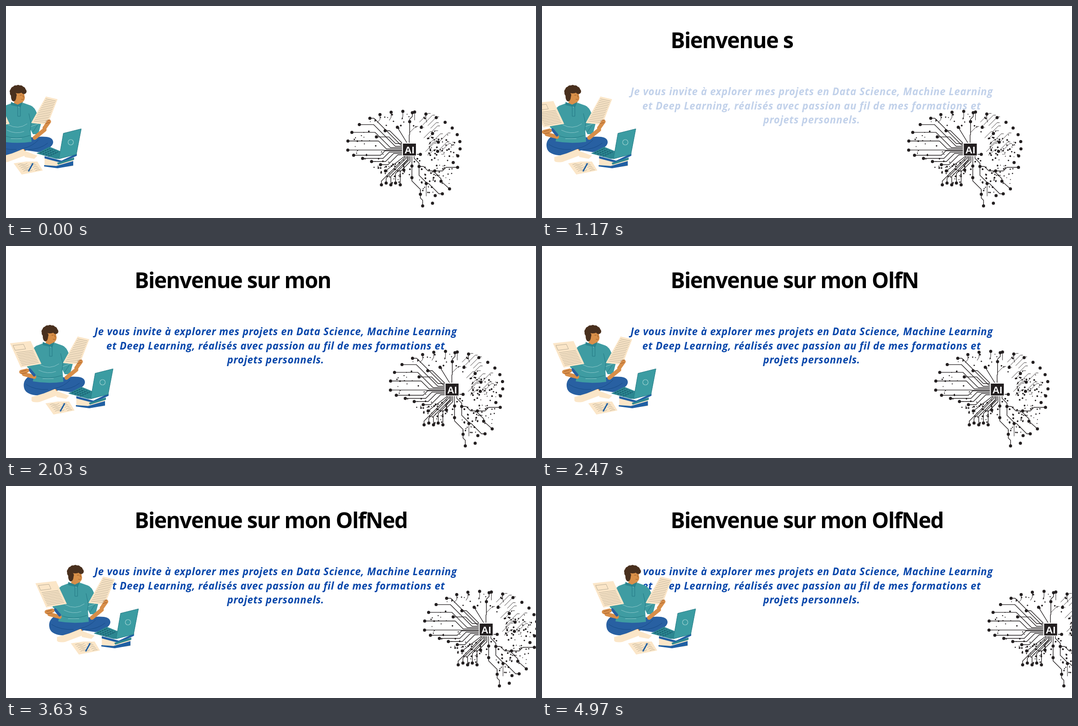
These frames come from a looping animation (1183 px wide and 473 px high, 5.01 s). An HTML page:

```html
<!DOCTYPE html>
<html lang="fr">
<head>
<meta charset="utf-8">
<title>Bienvenue</title>
<style>
  html, body { margin: 0; width: 100%; height: 100%; overflow: hidden; background: #fff; }
  svg { display: block; width: 100vw; height: 100vh; }
  text { white-space: pre; }
  #title { font: 700 48px "Open Sans", "Noto Sans", sans-serif; letter-spacing: -1.55px; }
  #intro { font: italic 700 22.5px "Open Sans", "Noto Sans", sans-serif; letter-spacing: .7px; fill: #0746aa; text-anchor: middle; }
  #chip { font: 700 22px "Liberation Sans", Arial, sans-serif; fill: #fff; text-anchor: middle; }
  .line { fill: none; stroke-linecap: round; stroke-linejoin: round; }
  .paper { fill: #fbe6c8; }
  .skin { stroke: #d88e49; }
  .rule { stroke: #a89d88; stroke-width: .8; }
</style>
</head>
<body>
<svg viewBox="0 0 1183 473">
  <g id="brain">
    <g id="traces" class="line" stroke="#231f20"></g>
    <g id="dots" fill="#231f20"></g>
    <rect x="884" y="305" width="33" height="30" fill="#fff"/>
    <rect x="886" y="307" width="29" height="26.5" fill="#231f20"/>
    <text id="chip" x="900.5" y="328.5">AI</text>
  </g>

  <g id="intro">
    <text x="602" y="199">Je vous invite à explorer mes projets en Data Science, Machine Learning</text>
    <text x="602" y="231">et Deep Learning, réalisés avec passion au fil de mes formations et</text>
    <text x="602" y="262">projets personnels.</text>
  </g>

  <text id="title" x="287" y="94"></text>

  <g id="reader">
    <!-- books -->
    <path class="paper" d="M262 336 300 346 326 336V357L290 361 262 355Z"/>
    <path fill="#1f5fa3" d="M262 335 300 345 334 329V334L300 350 262 340ZM261 355 288 357 326 346V356L291 362 261 358Z"/>
    <path fill="#2d8791" d="M290 350 328 338V343L292 354Z"/>

    <!-- legs and feet -->
    <path fill="#2860a2" d="M158 290C146 296 142 307 146 319 150 330 168 336 190 332L222 322 248 326C268 322 283 312 281 302 279 291 262 290 238 293Z"/>
    <path class="line" stroke="#174c88" d="M150 309Q170 322 199 320M213 318Q234 314 248 299M226 321Q253 319 269 306"/>
    <path class="line skin" stroke-width="10" d="M196 332 214 324"/>
    <path class="paper" d="M162 337 189 329 215 319 220 333 180 348Q164 350 162 345ZM212 321 246 334 239 341 218 337Z"/>

    <!-- body -->
    <path fill="#d88e49" d="M196 207H213V222H192Z"/>
    <path fill="#3f9ca2" d="M188 217 172 223Q163 229 158 246L152 270 168 284 165 302Q199 308 233 303L231 276 236 286H248L254 263 246 242Q240 225 231 222L214 216 205 226Z"/>
    <path fill="#2b858f" d="M187 214 202 220 214 214 208 226 187 221Z"/>
    <path class="line" stroke="#247985" d="M202 222V246H208V222M227 240 232 263 230 278M174 290Q198 299 229 289M236 281 246 266"/>
    <path class="line" stroke="#8bc6c9" d="M181 265Q203 277 223 263M178 277Q198 287 216 280M187 296H211M232 269 247 263"/>
    <path fill="#d99049" d="M193 194Q205 187 216 192L218 205Q217 214 210 215 202 215 197 207Z"/>
    <path class="line" stroke="#925321" stroke-width=".9" d="M207 199H211M214 198V203H217M210 208Q213 210 216 207"/>
    <g id="hair" fill="#49301e"></g>

    <!-- sheets and arms -->
    <path class="line skin" stroke-width="9" d="M168 292 145 286M240 294 262 276"/>
    <path class="line" stroke="#2860a2" stroke-width="6" d="M158 276 168 288"/>
    <g id="sheets"></g>
    <path class="line skin" stroke-width="9" d="M139 281 152 278M262 272 272 258"/>
    <path class="line" stroke="#9b5928" d="M139 280 150 277M139 285 151 283M265 257 274 254M264 262 273 260"/>

    <!-- loose page -->
    <path class="paper" d="M193 351 221 347H246L258 367 211 376Z"/>
    <g id="notes" class="line rule"></g>
    <path stroke="#1f5fa3" stroke-width="3" d="M226 369 236 351"/>

    <!-- laptop -->
    <path fill="#2c8791" d="M244 329 273 314 300 325 297 341H288Z"/>
    <g id="keys" stroke="#185c70" stroke-width="2" stroke-dasharray="4 1.5"></g>
    <path fill="#3b9ca2" stroke="#277b86" d="M304 284 344 274 333 331 294 341Z"/>
    <circle cx="320.5" cy="304" r="6" fill="none" stroke="#9bd0cf" stroke-width="1.2"/>
  </g>
</svg>

<script>
const LOOP = 5010, FRAME = LOOP / 150;
const TITLE = "Bienvenue sur mon OlfNed";
const $ = id => document.getElementById(id);

function add(parent, tag, attrs) {
  const el = document.createElementNS("http://www.w3.org/2000/svg", tag);
  for (const key in attrs) el.setAttribute(key, attrs[key]);
  parent.append(el);
  return el;
}

function times(count, fn) {
  for (let i = 0; i < count; i++) fn(i);
}

let seed = 41;
function random() {
  seed = (seed * 16807) % 2147483647;
  return seed / 2147483647;
}

const dot = (x, y, r = 3.5) => add($("dots"), "circle", { cx: x, cy: y, r });

const wire = (points, width = 1.4) =>
  add($("traces"), "polyline", { points: points.join(" "), "stroke-width": width });

// The brain's dome is an ellipse; angles in degrees, clockwise from the right.
function dome(angle, scale = 1) {
  const a = angle * Math.PI / 180;
  return [888 + Math.cos(a) * 126 * scale, 312 + Math.sin(a) * 77 * scale];
}

// Circuit routing: straight, 45 degree diagonal, straight, ending in a dot.
function route([x0, y0], [x1, y1], vertical, bend = .4) {
  const dx = x1 - x0, dy = y1 - y0;
  const run = vertical ? dy : dx, rise = vertical ? dx : dy;
  const first = Math.sign(run) * Math.max(0, Math.abs(run) - Math.abs(rise)) * bend;
  const second = first + Math.sign(run) * Math.min(Math.abs(run), Math.abs(rise));
  const a = vertical ? [x0, y0 + first] : [x0 + first, y0];
  const b = vertical ? [x1, y0 + second] : [x0 + second, y1];
  wire([[x0, y0], a, b, [x1, y1]]);
  dot(x1, y1);
}

function specks(cx, cy, rx, ry, count, inner = 0) {
  times(count, () => {
    const a = random() * Math.PI * 2, d = Math.sqrt(inner + (1 - inner) * random());
    dot(cx + Math.cos(a) * d * rx, cy + Math.sin(a) * d * ry, .8 + random() * 1.3);
  });
}

function buildBrain() {
  // left fan
  times(5, i => route([886, 310 + i * 3], dome(233 - i * 15), false, .35));
  times(4, i => route([886, 323 + i * 3], [776 + i * 20, 333 + i * 7], false));
  times(3, i => route([888 + i * 4, 307], dome(208 + i * 25, .55), false));
  route([900, 307], [901, 258], true);
  route([901, 258], [907, 238], true);

  // rim with short stubs, and inner nodes
  times(13, i => {
    const angle = 245 + i * 12, tip = dome(angle);
    dot(...tip);
    if (i < 5) wire([tip, [tip[0], tip[1] + 11], [tip[0] - 6 + i * 2, tip[1] + 18]], 1);
  });
  times(4, i => dot(...dome(300 + i * 25, .62)));

  // broken diagonals on the right
  times(16, i => {
    const [x, y] = dome(285 + i * 7, .4 + random() * .35), len = 8 + random() * 14;
    wire([[x, y], [x + len, y - len], [x + len + 5, y - len]], .9);
  });

  // lower fans
  times(5, i => route([890 + i * 3, 335], [838 + i * 10.5, 399 - i % 2 * 4], true, .3));
  route([890, 335], [847, 368], true);
  route([896, 335], [888, 366], true);

  // stem branches
  const fork = [922, 358], hub = [957, 368], knee = [938, 396], bend = [906, 383];
  route([906, 335], [906, 357], true);
  route([906, 357], bend, true);
  route(bend, [925, 420], true);
  route([925, 420], [930, 446], true);
  route([911, 335], fork, true);
  route(fork, hub, false);
  route(hub, [1008, 360], false);
  route(fork, knee, true, .9);
  route(knee, [974, 419], false);
  route(hub, [971, 391], true);
  route([971, 391], [990, 408], true);
  route([915, 331], [925, 331], false);
  wire([knee, [938, 424]], 1);
  times(2, i => dot(958 - i * 6, 423 + i * 17));

  // loose specks
  specks(888, 308, 112, 68, 95, .25);
  specks(975, 340, 34, 65, 50);
  specks(870, 373, 44, 27, 30);
  specks(945, 395, 24, 32, 26);
}

// A sheet given by its four corners, ruled from the given height down.
function sheet([a, b, c, d], rows, start = .08) {
  const mix = (p, q, k) => [p[0] + (q[0] - p[0]) * k, p[1] + (q[1] - p[1]) * k];
  const at = (u, v) => mix(mix(a, b, u), mix(d, c, u), v);
  add($("sheets"), "polygon", { points: [a, b, c, d].join(" "), class: "paper" });
  times(rows, i => {
    const v = start + (.92 - start) * i / (rows - 1);
    add($("sheets"), "polyline", { points: [at(.1, v), at(.9, v)].join(" "), class: "line rule" });
  });
  return at;
}

function buildReader() {
  const at = sheet([[114, 217], [160, 212], [184, 263], [138, 271]], 9, .4);
  add($("sheets"), "polygon", {
    points: [at(.1, .1), at(.6, .1), at(.6, .3), at(.1, .3)].join(" "), class: "line rule"
  });
  sheet([[265, 202], [291, 208], [269, 265], [232, 261]], 14);

  // curls over the head, lower at the back
  times(9, i => {
    const a = Math.PI * (.75 + i * .15);
    add($("hair"), "circle", { cx: 203 + Math.cos(a) * 13, cy: 192 + Math.sin(a) * 10, r: 6 });
  });
  add($("hair"), "ellipse", { cx: 193, cy: 202, rx: 6, ry: 11 });
  add($("hair"), "ellipse", { cx: 203, cy: 188, rx: 12, ry: 7 });

  times(5, i => {
    const x = 203 + i * 3, y = 354 + i * 3.6;
    add($("notes"), "path", { d: `M${x} ${y}q5 -3 10 -1t10 -2M${x + 27} ${y - 1}q4 -3 10 -2` });
  });
  times(4, i => add($("keys"), "path", { d: `M${252 + i * 6} ${328 + i * 2.5}l22 -10` }));
}

// Steady typing that slows a little for the last words.
const typed = t => Math.floor(Math.min(t / 104.5, t / 118 + 1.7));

function draw(t) {
  $("brain").setAttribute("transform", `translate(${t * .0475} 0)`);
  $("reader").setAttribute("transform", `translate(${(t - 4970) * .0354} 0)`);
  $("title").textContent = TITLE.slice(0, typed(t));
  $("intro").setAttribute("opacity", Math.min(1, Math.max(0, (t - 1000) / 700)));
}

function tick() {
  const t = (performance.now() - began) % LOOP;
  draw(Math.floor(t / FRAME) * FRAME);
  requestAnimationFrame(tick);
}

buildBrain();
buildReader();
const began = performance.now();
tick();
</script>
</body>
</html>
```
